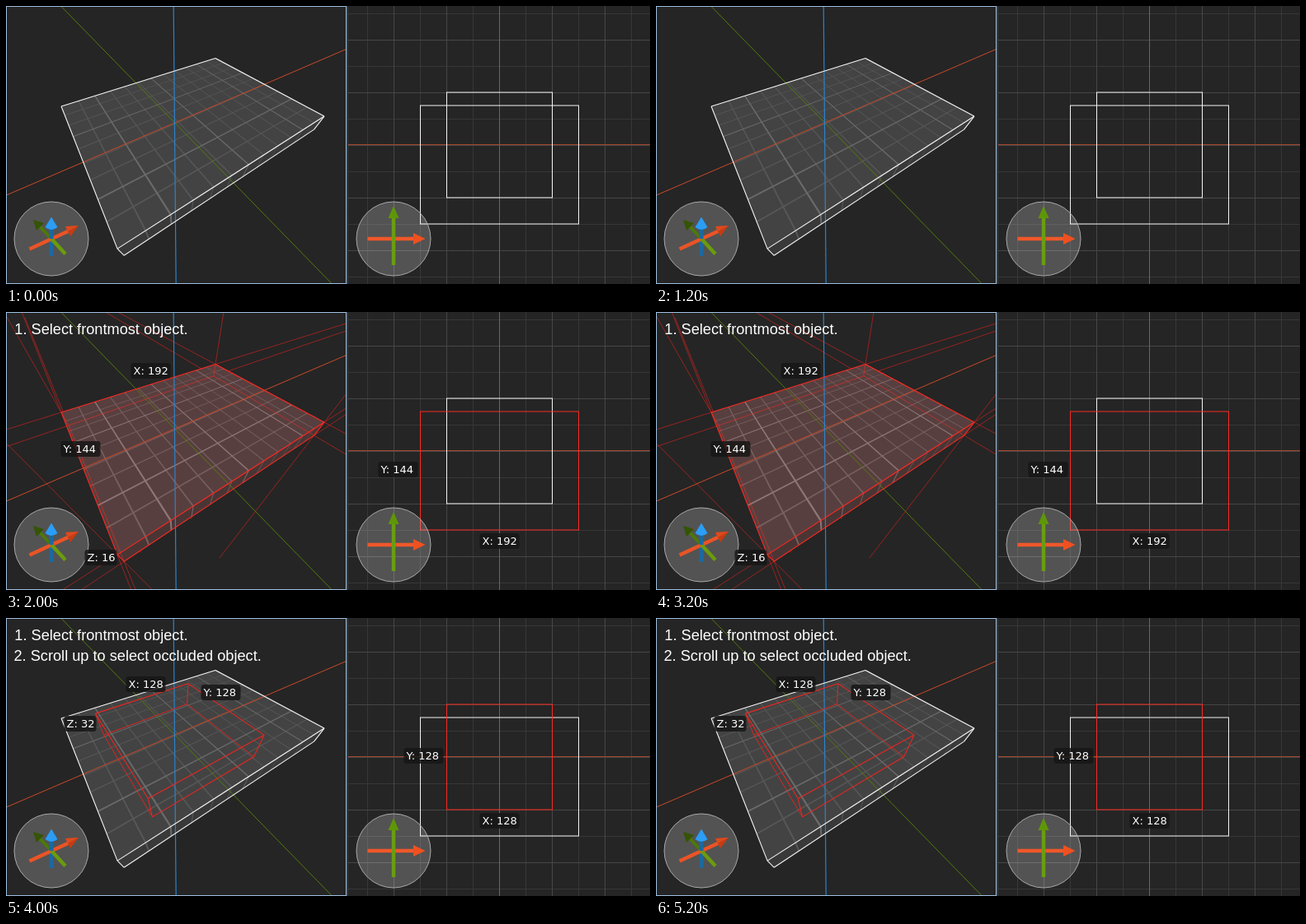
Write an HTML page that moves like this. It is 781 px wide and 338 px high and loops after 6 s.

```html
<!DOCTYPE html>
<html lang="en">
<head>
<meta charset="utf-8">
<title>Select occluded objects</title>
<style>
html, body { margin: 0; width: 100%; height: 100%; overflow: hidden; background: #252525; }
svg { display: block; }
.tag { font: 13px "DejaVu Sans", sans-serif; fill: #fff; }
.note { font: 18.2px "Liberation Sans", Arial, sans-serif; fill: #fff; }
</style>
</head>
<body>
<svg id="stage" width="781" height="338" viewBox="0 0 781 338"></svg>
<script>
const STEP = 2000;
const WHITE = '#f4f4f4', RED = '#fa2a22';

// Perspective camera: origin, vanishing points (x, y) and depth scale per axis
const ORIGIN = [204.1, 142.3];
const VANISH = [[725.6, -84], [-11.85, -78.6], [206.5, 367]];
const SCALE = [0.0017475, 0.002721, -0.00365];

// Boxes as [min, max] for x, y, z
const SLAB = [[-96, 96], [-96, 48], [16, 32]];
const CUBE = [[-64, 64], [-64, 64], [-16, 16]];

const depth = p => p.reduce((w, v, i) => w + v * SCALE[i], 1);

function project(p) {
  const w = depth(p);
  return [0, 1].map(k =>
    (p.reduce((s, v, i) => s + v * SCALE[i] * VANISH[i][k], ORIGIN[k]) / w).toFixed(2));
}

const line = (x1, y1, x2, y2, color, width = 1, more = '') =>
  `<line x1="${x1}" y1="${y1}" x2="${x2}" y2="${y2}" stroke="${color}" stroke-width="${width}" ${more}/>`;
const rect = (x, y, w, h, more) =>
  `<rect x="${x}" y="${y}" width="${w}" height="${h}" ${more}/>`;
const poly = (pts, fill) =>
  `<polygon points="${pts.map(p => p.join()).join(' ')}" fill="${fill}"/>`;
const line3 = (p, q, color, width, more) =>
  line(...project(p), ...project(q), color, width, more);
const poly3 = (pts, fill) => poly(pts.map(project), fill);

function corners(box) {
  const list = [];
  for (const x of box[0]) for (const y of box[1]) for (const z of box[2]) list.push([x, y, z]);
  return list;
}

function edges(box, color, hidden) {
  const near = box[1][0], top = box[2][1];
  let out = '';
  for (const p of corners(box)) {
    for (let i = 0; i < 3; i++) {
      if (p[i] !== box[i][0]) continue;
      const q = p.slice();
      q[i] = box[i][1];
      const seen = (p[1] === near && q[1] === near) || (p[2] === top && q[2] === top);
      if (seen) out += line3(p, q, color, 1.1);
      else if (hidden) out += line3(p, q, color, 1, `opacity="${hidden}"`);
    }
  }
  return out;
}

// Guide rays running outwards from every corner along each axis
function guides(box) {
  let out = '';
  for (const p of corners(box)) {
    for (let i = 0; i < 3; i++) {
      const dir = p[i] === box[i][1] ? 1 : -1;
      const fall = -dir * SCALE[i];
      const reach = fall > 0 ? Math.min(512, (depth(p) - 0.04) / fall) : 512;
      const q = p.slice();
      q[i] += dir * reach;
      out += line3(p, q, '#e0231d', 1, 'opacity=".6"');
    }
  }
  return out;
}

function slabFaces(picked) {
  const [[x0, x1], [y0, y1], [z0, z1]] = SLAB;
  const [top, side, minor, major] = picked
    ? ['#583f3f', '#4a3535', '#786060', '#8d7676']
    : ['#434343', '#393939', '#575757', '#6a6a6a'];
  let out = poly3([[x0, y0, z1], [x1, y0, z1], [x1, y1, z1], [x0, y1, z1]], top)
    + poly3([[x0, y0, z0], [x1, y0, z0], [x1, y0, z1], [x0, y0, z1]], side);
  for (const strong of [false, true]) {
    const h = strong ? 0.55 : 0.45, color = strong ? major : minor;
    for (let x = x0 + 16; x < x1; x += 16) {
      if ((x % 64 === 0) !== strong) continue;
      out += poly3([[x - h, y0, z1], [x + h, y0, z1], [x + h, y1, z1], [x - h, y1, z1]], color)
        + poly3([[x - h, y0, z0], [x + h, y0, z0], [x + h, y0, z1], [x - h, y0, z1]], color);
    }
    for (let y = y0 + 16; y < y1; y += 16) {
      if ((y % 64 === 0) !== strong) continue;
      out += poly3([[x0, y - h, z1], [x1, y - h, z1], [x1, y + h, z1], [x0, y + h, z1]], color);
    }
  }
  return out;
}

const disc = x =>
  `<circle cx="${x}" cy="283" r="45" fill="#fff" fill-opacity=".21" stroke="#a9a9a9"/>`;

function compass3() {
  return disc(55)
    + line(55, 283, 40, 267, '#4c7a08', 4)
    + poly([[33, 260], [46, 264], [37, 273]], '#355404')
    + line(55, 304, 55, 268, '#1d689f', 5)
    + line(28.5, 295.5, 76, 273.5, '#ea5426', 4.5)
    + line(55, 283, 72, 301.5, '#6a9c0e', 4.5)
    + line(55, 283, 55, 268, '#1d689f', 5)
    + poly([[88, 267], [72, 268], [78, 280]], '#c43c14')
    + poly([[88, 267], [72, 268], [75, 274]], '#dc4a1e')
    + '<path d="M55 256.5 L47.5 269 Q55 275 62.5 269 Z" fill="#2b9df4"/>';
}

function compass2() {
  return disc(470)
    + line(438.5, 283, 495, 283, '#f0572a', 4.5)
    + poly([[508.5, 283], [494, 276], [494, 290]], '#ef5020')
    + line(470, 315, 470, 257, '#699d10', 4.5)
    + poly([[470, 243], [463.5, 258], [476.5, 258]], '#5e9608');
}

function plan() {
  let out = '';
  for (const strong of [false, true]) {
    const color = strong ? '#474747' : '#373737';
    for (let i = -5; i <= 5; i++) {
      if ((i % 2 === 0) !== strong) continue;
      const x = 598.5 + 32 * i, y = 169.5 + 32 * i;
      out += line(x, 0, x, 338, color) + line(415, y, 781, y, color);
    }
  }
  return out + line(415, 168.5, 781, 168.5, '#a4452c') + line(598.5, 0, 598.5, 338, '#587f10');
}

function outline(box, color) {
  const [[x0, x1], [y0, y1]] = box;
  return rect(598.5 + x0, 169.5 - y1 - 0.5, x1 - x0, y1 - y0, `fill="none" stroke="${color}"`);
}

function tag(x, y, text) {
  const w = text.length > 5 ? 48 : 39;
  return rect(x - 3.5, y - 14, w, 19, 'rx="3.5" fill="#151515" fill-opacity=".82"')
    + `<text class="tag" x="${x - 0.5}" y="${y}">${text}</text>`;
}

const note = (x, y, text) => `<text class="note" x="${x}" y="${y}">${text}</text>`;

const axes = line(0, 230.2, 413, 52.3, '#c94a28')
  + line(66.5, 0, 395.5, 338, '#517b0d')
  + line(203.2, 0, 206.2, 338, '#2b83cc', 1.2);

const tags = [
  [],
  [[155, 76, 'X: 192'], [70, 171, 'Y: 144'], [99, 303, 'Z: 16'],
   [455, 196, 'Y: 144'], [578, 283, 'X: 192']],
  [[149, 85, 'X: 128'], [240, 95, 'Y: 128'], [74, 133, 'Z: 32'],
   [486, 172, 'Y: 128'], [578, 251, 'X: 128']]
];
const notes = [
  note(10.3, 27, '1. Select frontmost object.'),
  note(9.5, 51.5, '2. Scroll up to select occluded object.')
];

function scene(step) {
  const slab = step === 1, cube = step === 2;
  const slabColor = slab ? RED : WHITE;
  const flat = [outline(SLAB, slabColor), outline(CUBE, cube ? RED : WHITE)];
  if (slab) flat.reverse();
  return rect(0, 0, 781, 338, 'fill="#252525"')
    + '<g clip-path="url(#left)">'
    + (slab ? guides(SLAB) : '')
    + slabFaces(slab) + axes
    + edges(SLAB, slabColor, slab ? 0.55 : 0)
    + (cube ? edges(CUBE, '#e8261f', 0.9) : '')
    + compass3() + '</g>'
    + '<g clip-path="url(#right)">' + plan() + flat.join('') + compass2() + '</g>'
    + rect(413, 0, 2, 338, 'fill="#3a3a3a"')
    + rect(0.5, 0.5, 412, 337, 'fill="none" stroke="#9dbfe0"')
    + tags[step].map(t => tag(...t)).join('')
    + notes.slice(0, step).join('');
}

const stage = document.getElementById('stage');
stage.innerHTML = '<defs>'
  + `<clipPath id="left">${rect(0, 0, 413, 338, '')}</clipPath>`
  + `<clipPath id="right">${rect(415, 0, 366, 338, '')}</clipPath></defs><g id="view"></g>`;
const view = document.getElementById('view');
const start = performance.now();
let shown = -1;

function draw() {
  const step = Math.floor(Math.max(0, performance.now() - start) / STEP) % 3;
  if (step !== shown) view.innerHTML = scene(shown = step);
  requestAnimationFrame(draw);
}
draw();
</script>
</body>
</html>
```
